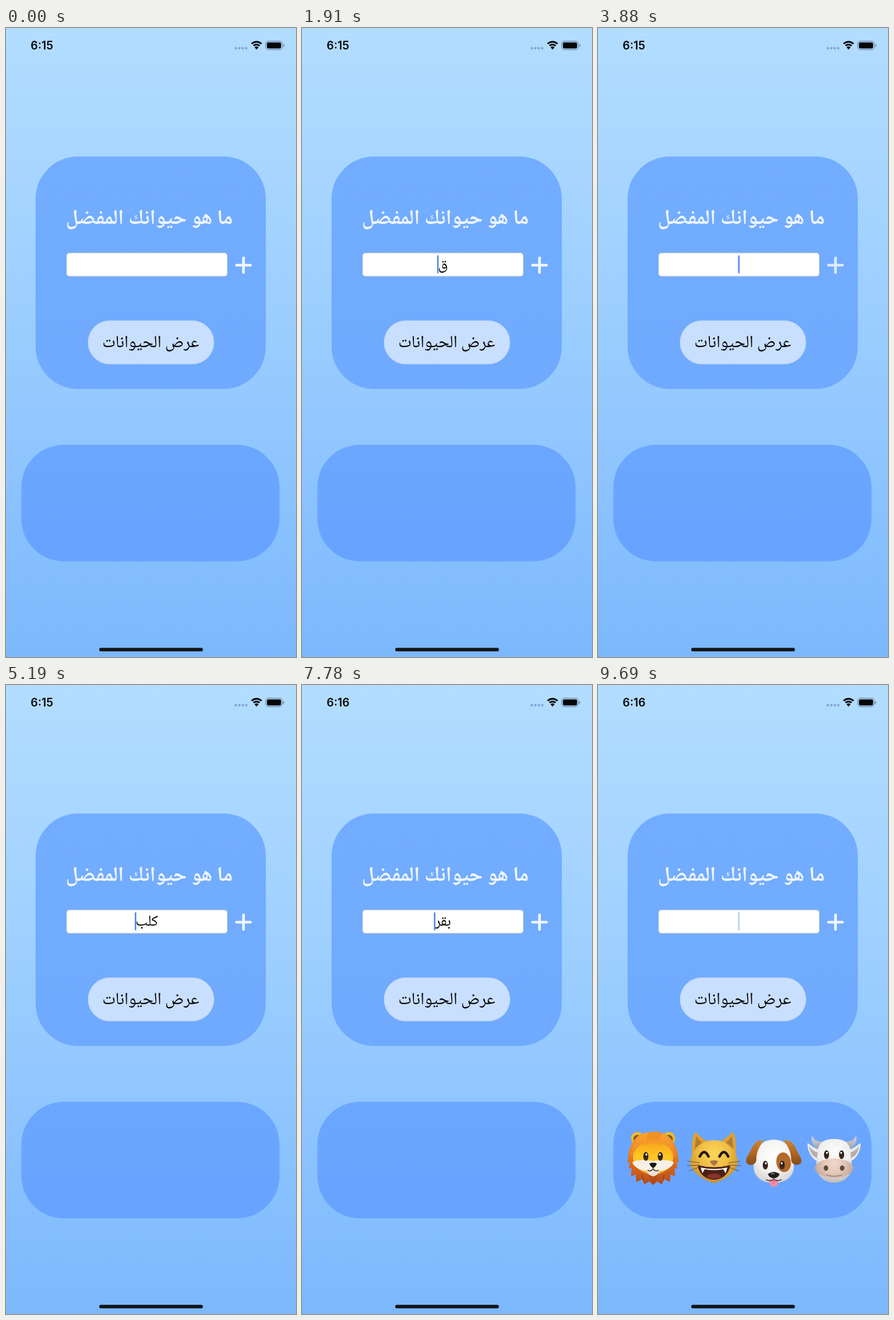
Write an HTML page with a canvas that moves like this. It is 500 px wide and 1082 px high and loops after 9.83 s.

```html
<!DOCTYPE html>
<html lang="ar">
<head>
<meta charset="utf-8">
<title>ما هو حيوانك المفضل</title>
<style>
  html, body { margin: 0; width: 100%; height: 100%; overflow: hidden; background: #98cbff; }
  canvas { display: block; width: 500px; height: 1082px; }
</style>
</head>
<body>
<canvas id="stage" width="500" height="1082"></canvas>
<script>
const ctx = document.getElementById('stage').getContext('2d');
const LOOP = 9830;
const ARABIC = '"Noto Naskh Arabic", "Noto Sans Arabic", "DejaVu Sans", serif';
const LATIN = 'Inter, "Liberation Sans", sans-serif';

// [start ms, typed text, caret opacity, plus opacity, button opacity, animals shown]
const STEPS = [
  [0, '', 0], [100, '', .5], [240, '', 1],
  [790, 'أ', 1], [1100, 'أس', 1], [1260, 'أسد', 1],
  [1570, 'أسد', 1, .35], [1740, '', 1, .8],
  [1910, 'ق', 1], [2350, 'قط', 1], [3290, 'قطة', 1],
  [3590, 'قطة', 1, .35], [3880, '', 1, .85], [3980, '', 1],
  [4240, 'ك', 1], [4600, 'كل', 1], [4890, 'كلب', 1],
  [5690, 'كلب', 1, .55], [5860, 'كلب', 1, .3], [6030, '', 1, .8], [6200, '', 1],
  [6630, 'ب', 1], [7010, 'بق', 1], [7470, 'بقر', 1], [7910, 'بقرة', 1],
  [8480, 'بقرة', 1, .55], [8630, 'بقرة', 1, .3], [8790, '', 1, .7], [8940, '', 1, .88],
  [9280, '', 1, 1, .55], [9420, '', .8, 1, .35], [9550, '', .6, 1, .8, true],
  [9690, '', .4, 1, 1, true]
];

function rounded(x, y, w, h, r, fill) {
  ctx.beginPath();
  ctx.roundRect(x, y, w, h, r);
  ctx.fillStyle = fill;
  ctx.fill();
}

function oval(x, y, rx, ry, fill, turn = 0) {
  ctx.beginPath();
  ctx.ellipse(x, y, rx, ry, turn, 0, Math.PI * 2);
  ctx.fillStyle = fill;
  ctx.fill();
}

function shape(path, fill) {
  ctx.fillStyle = fill;
  ctx.fill(new Path2D(path));
}

function line(path, color, width) {
  ctx.strokeStyle = color;
  ctx.lineWidth = width;
  ctx.lineCap = ctx.lineJoin = 'round';
  ctx.stroke(new Path2D(path));
}

function fade(y0, y1, ...colors) {
  const g = ctx.createLinearGradient(0, y0, 0, y1);
  colors.forEach((c, i) => g.addColorStop(i / (colors.length - 1), c));
  return g;
}

function glow(x, y, r, ...colors) {
  const g = ctx.createRadialGradient(x, y, 0, x, y, r);
  colors.forEach((c, i) => g.addColorStop(i / (colors.length - 1), c));
  return g;
}

function withAlpha(alpha, draw) {
  ctx.save();
  ctx.globalAlpha = alpha;
  draw();
  ctx.restore();
}

function bothSides(draw) {
  for (const side of [1, -1]) {
    ctx.save();
    ctx.scale(side, 1);
    draw();
    ctx.restore();
  }
}

// Picks the font size at which a phrase has the wanted natural width.
function sizeFor(phrase, width, weight) {
  ctx.font = `${weight} 100px ${ARABIC}`;
  return 100 * width / ctx.measureText(phrase).width;
}

function label(text, x, y, font, color, align = 'center', direction = 'rtl') {
  ctx.font = font;
  ctx.direction = direction;
  ctx.textAlign = align;
  ctx.fillStyle = color;
  ctx.fillText(text, x, y);
}

const TITLE = 'ما هو حيوانك المفضل';
const SHOW = 'عرض الحيوانات';
const titleFont = `700 ${sizeFor(TITLE, 288, 700)}px ${ARABIC}`;
const showFont = `400 ${sizeFor(SHOW, 167, 400)}px ${ARABIC}`;
const inputFont = `400 ${sizeFor('كلب', 39, 400)}px ${ARABIC}`;

function eye(x, y, rx, ry) {
  oval(x, y, rx, ry, fade(y - ry, y + ry, '#1c1412', '#4a2f22'));
  oval(x - .8, y - ry * .45, rx * .38, ry * .25, '#fff');
}

function lion() {
  bothSides(() => {
    oval(27, -34, 11, 11, '#f2b82a');
    oval(27, -33, 7, 7, '#6d5a35');
  });
  bothSides(() => shape('M0 -45C16 -46 30 -40 36 -25C42 -16 43 -5 44 9L40 6 42 18 37 17 38 31 30 28 29 41 19 36 15 45 7 40 0 46Z',
    fade(-46, 46, '#f7a22c', '#f0851f', '#d8641c', '#b04a1a')));
  shape('M-34 -8C-30 -34 30 -34 34 -8C37 10 28 24 0 29C-28 24 -37 10 -34 -8Z',
    fade(-30, 28, '#f6a51a', '#ffc928', '#f3b02c'));
  shape('M0 5C10 3 27 2 36 7C32 17 20 21 11 22Q0 32 -11 22C-20 21 -32 17 -36 7C-27 2 -10 3 0 5Z', '#f7f0e6');
  shape('M-11 22Q0 17 11 22Q8 30 0 31Q-8 30 -11 22Z', '#efe3d3');
  bothSides(() => shape('M0 -45C22 -45 37 -29 39 2C34 -7 31 -16 24 -21Q18 -25 11 -27L15 -21 4 -27 0 -22Z',
    fade(-46, 0, '#f9a632', '#ee8420')));
  shape('M-8 -45L5 -44 2 -48 16 -42 9 -32 -13 -31Z', '#f28f25');
  bothSides(() => eye(12.5, -3, 4.4, 7.5));
  shape('M-6.5 9Q0 6.5 6.5 9Q5 14 0 17Q-5 14 -6.5 9Z', '#171516');
  line('M0 16V19M0 19Q-4 23 -9 21M0 19Q4 23 9 21', '#3b2c26', 1.5);
  line('M-5 32L0 42 5 32M-19 28L-17 38M19 28L17 38', '#95401a', 1.3);
}

function cat() {
  bothSides(() => {
    shape('M8 -27C19 -32 27 -41 33 -45C38 -38 38 -20 38 -6Z', '#dda133');
    shape('M20 -25L31 -38 33 -15Z', '#b37c30');
  });
  shape('M0 -31C23 -31 39 -15 41 6C40 24 20 36 0 43C-20 36 -40 24 -41 6C-39 -15 -23 -31 0 -31Z',
    glow(0, -8, 50, '#fbd75c', '#f0bf45', '#cb8f2c'));
  bothSides(() => line('M9.5 -3Q17 -18 24.5 -3', '#24170f', 4.5));
  shape('M-28 12Q0 19 28 12C26 28 13 37 0 37C-13 37 -26 28 -28 12Z', '#4a2016');
  shape('M-23 16Q0 21 23 16L20 26 16 19Q0 22 -16 19L-20 26Z', '#fff');
  oval(0, 31, 12, 4.5, '#85352a');
  shape('M-7 5Q0 2 7 5Q5 11 0 13Q-5 11 -7 5Z', '#a87750');
  bothSides(() => line('M25 8L45 5M26 12L46 13M27 16L43 22', '#6e5238', 1));
}

function dog() {
  shape('M0 -36C21 -36 29 -22 32 -6C36 8 37 21 25 31C13 41 -13 41 -25 31C-37 21 -36 8 -32 -6C-29 -22 -21 -36 0 -36Z',
    glow(0, -8, 52, '#fff', '#f6f4f2', '#cfccc9'));
  bothSides(() => shape('M17 -34C28 -37 34 -30 39 -19C43 -10 50 -3 47 4C42 10 30 8 30 -2C30 -14 25 -25 17 -34Z',
    fade(-34, 8, '#c98534', '#b06622', '#864a15')));
  oval(17, 3, 12.5, 17, '#b16a29', -.15);
  bothSides(() => eye(14.5, 8, 4.5, 7.5));
  shape('M-7 32H7V40Q6 45 0 45Q-6 45 -7 40Z', '#f58aa0');
  line('M0 34V40', '#cf5c79', 1);
  shape('M-10 23Q0 16 10 23Q10 28 0 31Q-10 28 -10 23Z', '#201d1e');
  oval(-2, 22.5, 3.5, 1.2, '#777');
  line('M-13 33Q-5 37 0 32Q5 37 13 33', '#4e4240', 1.5);
}

function cow() {
  bothSides(() => {
    shape('M17 -29C29 -27 35 -32 38 -39C41 -28 35 -18 24 -16Z', fade(-39, -16, '#d5d6d8', '#a3a5a8'));
    shape('M23 -16C33 -14 39 -23 46 -26C46 -12 38 3 26 6Z', '#eceae8');
    shape('M28 -10Q37 -12 43 -21Q41 -5 29 0Z', '#b9aeaa');
  });
  shape('M0 -33C18 -33 27 -26 28 -12C29 2 33 12 29 24C23 35 14 42 0 42C-14 42 -23 35 -29 24C-33 12 -29 2 -28 -12C-27 -26 -18 -33 0 -33Z',
    glow(0, -12, 54, '#fbfbfb', '#efeeec', '#c2bebb'));
  bothSides(() => eye(13, -6, 4.4, 7.5));
  oval(0, 17, 33, 16.5, glow(0, 9, 35, '#f0d8ca', '#e2c8b9', '#c2a597'));
  bothSides(() => oval(14, 17, 4, 4.6, '#65483b', .15));
  line('M-13 29Q0 33 13 29', '#9c7f72', 1.4);
}

const ANIMALS = [[lion, 95, 814], [cat, 200, 814], [dog, 303, 818], [cow, 407, 814]];

function statusBar(clock) {
  label(clock, 42.6, 37, `600 19.4px ${LATIN}`, '#050607', 'left', 'ltr');
  for (let i = 0; i < 4; i++) oval(396.2 + i * 6, 34.7, 2.2, 2.2, '#86a6d8');
  ctx.strokeStyle = '#050607';
  ctx.lineCap = 'butt';
  ctx.lineWidth = 3;
  for (const r of [12, 7.4]) {
    ctx.beginPath();
    ctx.arc(432, 35.8, r, -2.35, -.79);
    ctx.stroke();
  }
  shape('M432 37L428.4 33.2Q432 30 435.6 33.2Z', '#050607');
  ctx.lineWidth = 1.1;
  ctx.strokeStyle = '#6b88a8';
  ctx.beginPath();
  ctx.roundRect(447.7, 22.6, 28.7, 14.8, 4.4);
  ctx.stroke();
  rounded(449.8, 24.7, 24.5, 10.6, 2.4, '#050607');
  rounded(477.8, 27.7, 1.7, 4.8, 1, '#6b88a8');
}

function draw(ms) {
  const [, text, caret, plus = 1, button = 1, animals = false] =
    STEPS.findLast(step => step[0] <= ms);

  ctx.fillStyle = fade(0, 1082, '#b2ddff', '#a2d2ff', '#90c6ff', '#7cb8fd');
  ctx.fillRect(0, 0, 500, 1082);
  statusBar(ms < 7470 ? '6:15' : '6:16');

  rounded(51, 221, 397, 400, 73, fade(221, 621, '#73adff', '#6faafe'));
  label(TITLE, 247, 337, titleFont, '#eff5fe');

  rounded(104, 386.5, 278, 41, 5.5, '#c8cbd0');
  rounded(105, 387.5, 276, 39, 4.5, '#fff');
  ctx.font = inputFont;
  const width = text ? ctx.measureText(text).width : 0;
  label(text, 243, 414, inputFont, '#090909');
  withAlpha(caret, () => rounded(241.5 - width / 2, 391, 2.6, 31, 1, '#4c8ae8'));

  withAlpha(plus, () => line('M397.5 408H421.6M409.5 395.6V420.6', '#f2f6ff', 4.6));

  withAlpha(button, () => {
    rounded(141, 503, 218, 75.5, 37.75, '#b9d2f5');
    rounded(142, 504, 216, 73.5, 36.75, '#c8dfff');
    label(SHOW, 249.5, 549, showFont, '#050607');
  });

  rounded(26.5, 717, 445, 200.5, 73, fade(717, 917, '#6ba7ff', '#67a3fe'));
  if (animals) {
    for (const [paint, x, y] of ANIMALS) {
      ctx.save();
      ctx.translate(x, y);
      paint();
      ctx.restore();
    }
  }
  rounded(160.7, 1066.2, 178.8, 6, 3, '#111418');
}

const start = performance.now();
function tick() {
  draw((performance.now() - start) % LOOP);
  requestAnimationFrame(tick);
}
tick();
</script>
</body>
</html>
```
